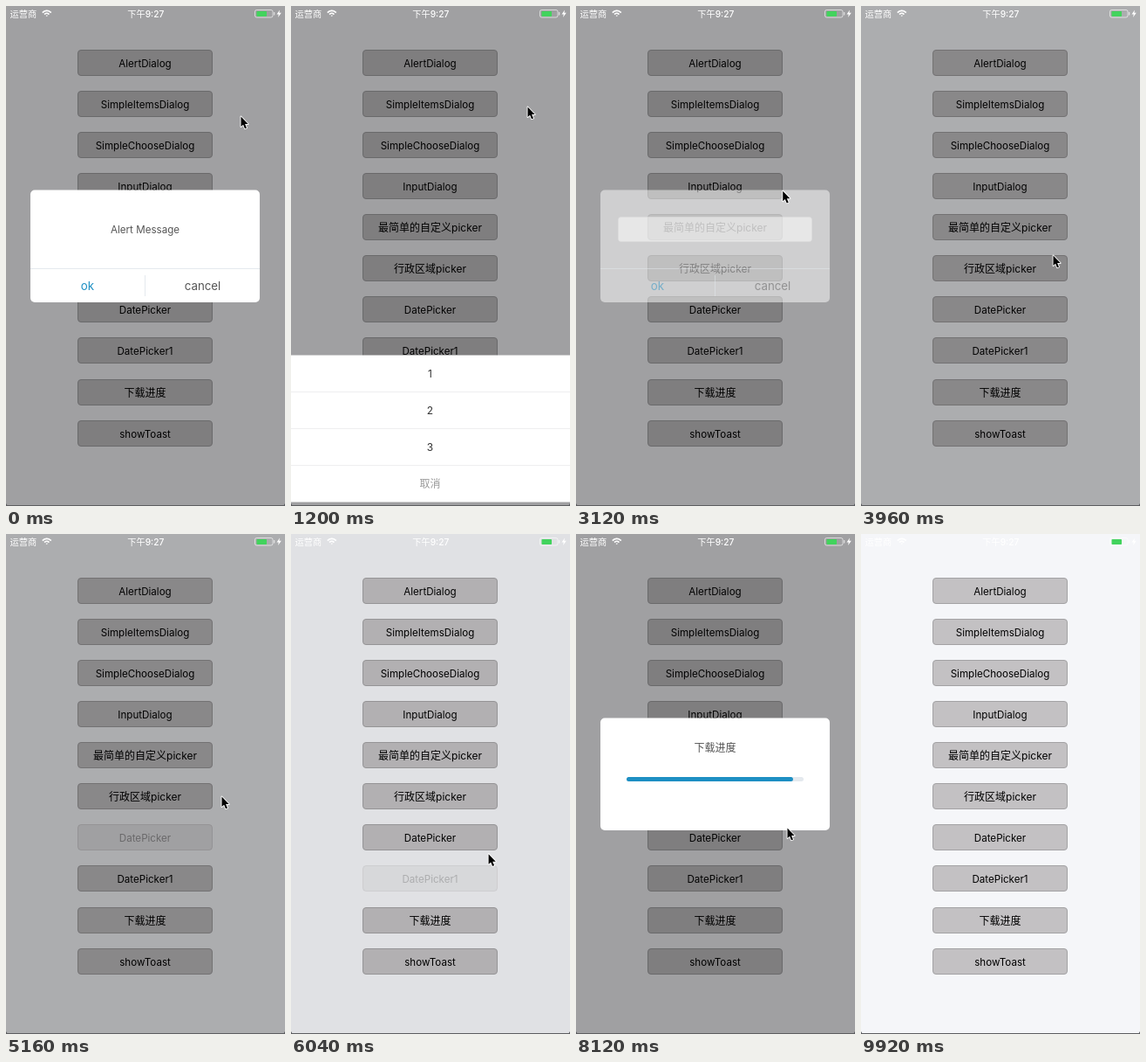
Write an HTML page with a canvas that moves like this. It is 320 px wide and 572 px high and loops after 10000 ms.

```html
<!DOCTYPE html>
<html lang="zh-CN">
<head>
<meta charset="utf-8">
<title>Dialogs</title>
<style>
  html, body { margin: 0; width: 100%; height: 100%; overflow: hidden; background: #f5f6f9; }
  canvas { display: block; width: 320px; height: 572px; }
</style>
</head>
<body>
<canvas id="stage"></canvas>
<script>
const W = 320, H = 572, CENTER = 159.5, LOOP = 10000, STEP = 40, DIM = 0.35;
const MASK_IN = 160, PANEL_IN = 140, PANEL_OUT = 120, MASK_OUT = 140, TRAVEL = 130;
const FAMILY = 'Inter, "Noto Sans CJK SC", "Noto Sans CJK", sans-serif';
const BLUE = '#1d8fc3', LINE = '#e4e9ee';

const canvas = document.getElementById('stage');
const ctx = canvas.getContext('2d');
const ratio = window.devicePixelRatio || 1;
canvas.width = W * ratio;
canvas.height = H * ratio;

const labels = ['AlertDialog', 'SimpleItemsDialog', 'SimpleChooseDialog', 'InputDialog',
  '最简单的自定义picker', '行政区域picker', 'DatePicker', 'DatePicker1', '下载进度', 'showToast'];

// One dialog per button; the pointer waits at `rest` until it closes.
const dialogs = [
  { open: -600, close: 40, rest: [269, 126], draw: drawAlert },
  { open: 700, close: 1260, rest: [271, 115], draw: drawSheet },
  { open: 1740, close: 2040, rest: [250, 160], draw: drawSheet },
  { open: 2500, close: 3060, rest: [250, 190], draw: drawInput },
  { open: 3500, close: 3819, rest: [248, 250], draw: drawPicker },
  { open: 4200, close: 4700, rest: [248, 275], draw: drawPicker },
  { open: 5023, close: 5500, rest: [247, 300], draw: drawPicker },
  { open: 6000, close: 6500, rest: [247, 320], draw: drawPicker },
  { open: 6870, close: 8180, rest: [242, 336], draw: drawProgress }
];

const clamp = v => Math.max(0, Math.min(1, v));
const easeOut = v => 1 - (1 - v) ** 2;
const smooth = v => v * v * (3 - 2 * v);
const buttonTop = i => Math.round(50 + 47.07 * i);

// Pointer moves: where it goes, when it leaves and how long it travels.
const moves = dialogs.flatMap(({ open, close, rest }, i) => {
  const move = { at: open, time: TRAVEL, to: rest };
  const next = dialogs[i + 1];
  return next ? [move, { at: close, time: TRAVEL, to: [220, buttonTop(i + 1)] }] : [move];
});
moves.push(
  { at: 8180, time: 260, to: [243, 370] },
  { at: 8920, time: 160, to: [277, 408] },
  { at: 9240, time: 360, to: [306, 398] },
  { at: 9720, time: 160, to: [118, 315] }
);
const POINTER_END = 9900;

function text(str, x, y, size, color, align = 'center', weight = 400) {
  ctx.font = `${weight} ${size}px ${FAMILY}`;
  ctx.fillStyle = color;
  ctx.textAlign = align;
  ctx.fillText(str, x, y + size * 0.365);
}

function rect(x, y, w, h, color) {
  ctx.fillStyle = color;
  ctx.fillRect(x, y, w, h);
}

function box(x, y, w, h, r, fill, stroke) {
  ctx.beginPath();
  ctx.roundRect(x, y, w, h, r);
  if (fill) { ctx.fillStyle = fill; ctx.fill(); }
  if (stroke) { ctx.strokeStyle = stroke; ctx.lineWidth = 1; ctx.stroke(); }
}

function polygon(points, fill) {
  ctx.beginPath();
  points.forEach(([x, y]) => ctx.lineTo(x, y));
  ctx.closePath();
  ctx.fillStyle = fill;
  ctx.fill();
}

function pressOpacity(dialog, t) {
  const age = dialog ? t - dialog.open : Infinity;
  return age < -60 ? 1 : 0.2 + 0.8 * clamp((age - 100) / 200);
}

function drawButtons(t) {
  labels.forEach((label, i) => {
    const y = buttonTop(i);
    const size = /^\w+$/.test(label) ? 11.6 : 12;
    ctx.globalAlpha = pressOpacity(dialogs[i], t);
    box(82.5, y + 0.5, 154, 29, 3.5, '#c3c1c3', '#a3a2a4');
    text(label, CENTER, y + 15.3, size, '#000');
  });
  ctx.globalAlpha = 1;
}

function drawCard(shown, body) {
  ctx.globalAlpha = shown;
  box(28, 210.5, 263, 128.5, 5, '#fff');
  body();
  ctx.globalAlpha = 1;
}

function drawActions() {
  rect(28, 300, 263, 1, LINE);
  rect(159, 308, 1, 24, LINE);
  text('ok', 93.5, 320, 13.3, BLUE);
  text('cancel', 225.5, 320, 13.3, '#555');
}

function drawAlert(shown) {
  drawCard(shown, () => {
    text('Alert Message', CENTER, 255.5, 11.6, '#555');
    drawActions();
  });
}

function drawInput(shown) {
  drawCard(shown, () => {
    box(48.5, 241.5, 222, 28, 3, '#fff', '#ddd');
    drawActions();
  });
}

function drawProgress(shown, t, dialog) {
  const begin = dialog.open + MASK_IN + PANEL_IN;
  const done = clamp((t - begin) / (dialog.close - begin));
  drawCard(shown, () => {
    text('下载进度', CENTER, 245, 12, '#555');
    box(58, 278, 203, 5, 2.5, LINE);
    box(58, 278, 203 * done, 5, 2.5, BLUE);
  });
}

function slideUp(height, shown, body) {
  ctx.save();
  ctx.translate(0, (1 - shown) * (height + 5));
  rect(0, 567.5 - height, W, height, '#fff');
  body();
  ctx.restore();
}

function drawSheet(shown) {
  slideUp(168, shown, () => {
    ['1', '2', '3', '取消'].forEach((item, i) => {
      if (i) rect(0, 399 + 42 * i, W, 1, '#eeeef0');
      text(item, CENTER, 420.7 + 42 * i, 12, i < 3 ? '#333' : '#999');
    });
  });
}

function drawPicker(shown) {
  slideUp(190, shown, () => {
    text('取消', 30, 398, 12, '#999');
    text('ok', 290, 398, 12, BLUE);
    ['1', '2', '3'].forEach((item, i) => {
      rect(0, 429 + 42 * i, W, 1, LINE);
      text(item, CENTER, 450 + 42 * i, 12, i === 1 ? '#333' : '#999');
    });
  });
}

// The mask fades in before the panel enters; leaving runs in reverse.
function drawDialog(dialog, t) {
  const { open, close } = dialog;
  const mask = Math.min(clamp((t - open) / MASK_IN),
    1 - clamp((t - close - PANEL_OUT) / MASK_OUT));
  const panel = Math.min(easeOut(clamp((t - open - MASK_IN) / PANEL_IN)),
    1 - clamp((t - close) / PANEL_OUT));
  rect(0, 0, W, H, `rgba(0,0,0,${DIM * mask})`);
  if (panel > 0) dialog.draw(panel, t, dialog);
}

function drawStatusBar() {
  text('运营商', 4.5, 9, 10.3, '#fff', 'left');
  text('下午9:27', 160.3, 9, 10.2, '#fff', 'center', 500);
  ctx.strokeStyle = '#fff';
  ctx.lineWidth = 1.7;
  for (const r of [0.7, 3.6, 6.6]) {
    ctx.beginPath();
    ctx.arc(46.8, 12, r, -Math.PI * 0.77, -Math.PI * 0.23);
    ctx.stroke();
  }
  const shell = 'rgba(255,255,255,.6)';
  box(285.5, 4.5, 20.5, 8.5, 2, null, shell);
  rect(307, 7, 1.3, 3.5, shell);
  box(287.5, 6, 11.5, 6, 0.8, '#42d35d');
  polygon([[314, 4.5], [310.5, 9.4], [312.8, 9.4], [312, 13], [315.8, 7.8], [313.4, 7.8]], '#fff');
}

function drawBottomEdge() {
  const color = '#5c5d60';
  rect(0, 571, W, 1, color);
  polygon([[0, 569], [2, 572], [0, 572]], color);
  polygon([[W, 569], [W - 2, 572], [W, 572]], color);
}

function pointerAt(t) {
  const i = moves.findLastIndex(move => move.at <= t);
  const { at, time, to } = moves[i];
  const from = i ? moves[i - 1].to : to;
  const k = smooth(clamp((t - at) / time));
  return from.map((v, axis) => v + (to[axis] - v) * k);
}

function drawPointer(t) {
  if (t > POINTER_END) return;
  ctx.save();
  ctx.translate(...pointerAt(t));
  ctx.lineJoin = 'round';
  ctx.lineWidth = 1.8;
  ctx.strokeStyle = '#fff';
  const arrow = [[0.5, 0.5], [0.5, 12], [3.1, 9.7], [5, 14.2], [7, 13.4], [5.1, 9], [8.7, 9]];
  polygon(arrow, '#000');
  ctx.stroke();
  ctx.fill();
  ctx.restore();
}

function render(t) {
  ctx.setTransform(ratio, 0, 0, ratio, 0, 0);
  rect(0, 0, W, H, '#f5f6f9');
  drawButtons(t);
  dialogs.forEach(dialog => drawDialog(dialog, t));
  drawStatusBar();
  drawBottomEdge();
  drawPointer(t);
}

let start;
function frame(now) {
  start ??= now;
  render(Math.floor(((now - start) % LOOP) / STEP) * STEP);
  requestAnimationFrame(frame);
}
render(0);
requestAnimationFrame(frame);
</script>
</body>
</html>
```
